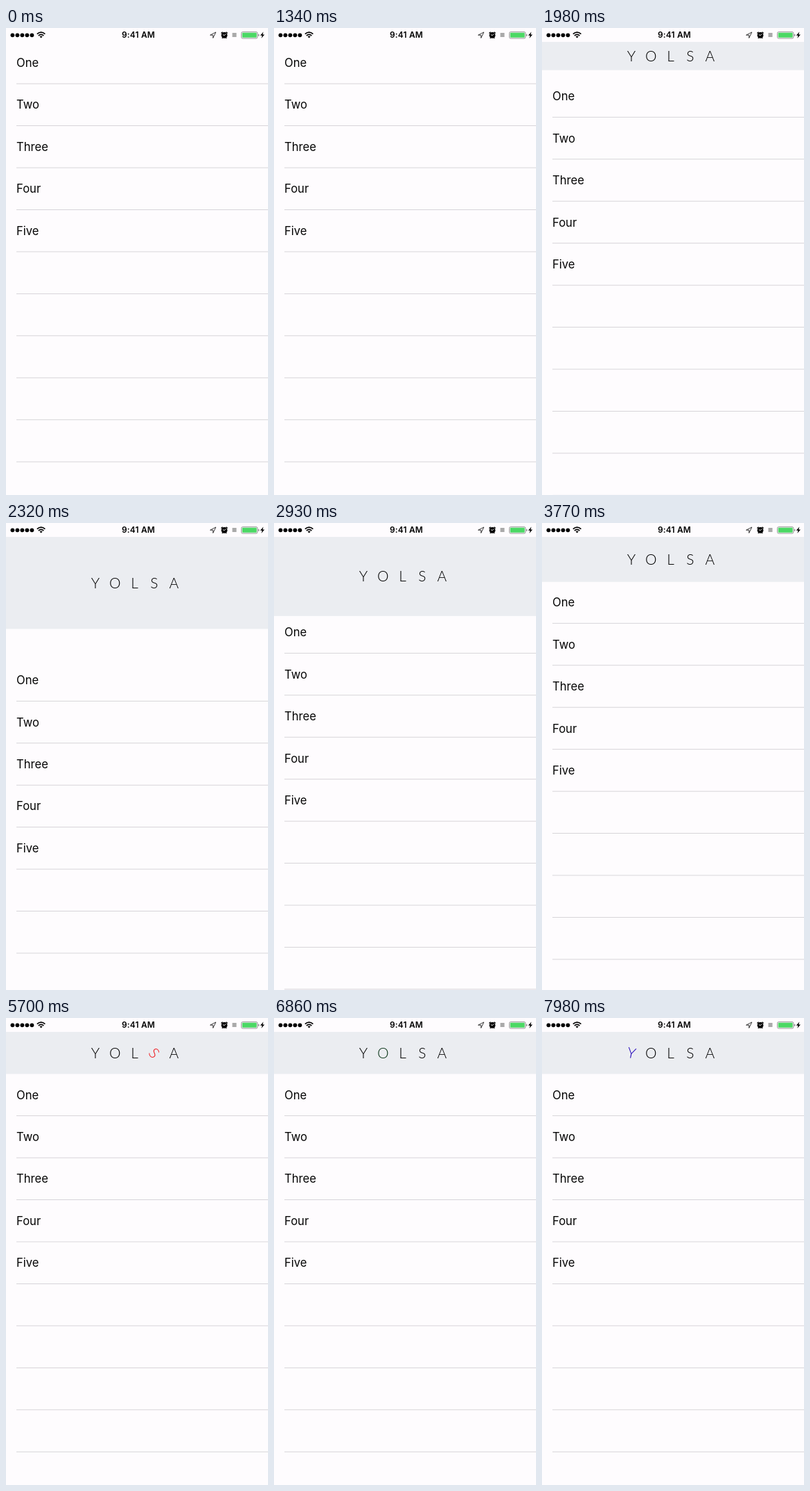
An HTML page for the animation above (8 s loop, 378x672 px).

```html
<!DOCTYPE html>
<html lang="en">
<head>
<meta charset="utf-8">
<title>Pull to refresh</title>
<style>
  html, body { margin: 0; width: 100%; height: 100%; overflow: hidden; background: #fefcfe; }
  svg { display: block; width: 378px; height: 672px; }
  .row { font: 400 16.6px Inter, sans-serif; fill: #050505; }
  .time { font: 600 11.9px Inter, sans-serif; letter-spacing: .2px; text-anchor: middle; }
  .title { font: 300 20.8px Lato, sans-serif; text-anchor: middle; }
</style>
</head>
<body>
<svg viewBox="0 0 378 672">
  <rect width="378" height="672" fill="#fefcfe"/>
  <g id="list"></g>
  <clipPath id="clip"><rect id="clipBox" y="20" width="378" height="0"/></clipPath>
  <rect id="header" y="20" width="378" height="0" fill="#ebedf1"/>
  <g clip-path="url(#clip)"><g id="title" class="title"></g></g>

  <rect width="378" height="20" fill="#fefcfe"/>
  <g id="dots"></g>
  <g fill="none" stroke="#000" stroke-width="1.7">
    <path d="M44.8 8.6Q50.6 3.6 56.4 8.6M46.9 11Q50.6 7.8 54.3 11"/>
    <path d="M48.6 12.2Q50.6 10.8 52.6 12.2L50.6 14.4Z" fill="#000" stroke="none"/>
  </g>
  <text class="time" x="191" y="14.4">9:41 AM</text>
  <path d="M302.8 6L294.6 10.2H298.7V14.4Z" fill="none" stroke="#222" stroke-width=".9" stroke-linejoin="round"/>
  <circle cx="315" cy="10.4" r="4.4"/>
  <path d="M310.4 7.6L312.6 5.7M319.6 7.6L317.4 5.7M311.8 14.8L312.8 13.6M318.2 14.8L317.2 13.6" stroke="#000" stroke-width="1.3"/>
  <path d="M315 10.6L317.3 8.6M315 10.6L312.8 9.6" stroke="#fff" stroke-width=".9"/>
  <rect x="326.5" y="7" width="6" height="6" fill="#aaa"/>
  <rect x="339.6" y="5.6" width="23.2" height="9.4" rx="1.8" fill="#fefcfe" stroke="#8b8b8b" stroke-width=".9"/>
  <rect x="340.8" y="6.8" width="20.8" height="7" rx=".8" fill="#4bd864"/>
  <path d="M363.8 8.5Q365.4 8.8 365.4 10.3T363.8 12.1Z" fill="#8b8b8b"/>
  <path d="M371.4 5.6L366.8 10.8H369.5L368.4 14.8L373 9.5H370.3Z"/>
</svg>
<script>
const LOOP = 8000, ROW = 60.45, LAG = 44;
const REST = 60.5, PERIOD = 845, SPIN = 790, FIRST_SPIN = 4110;
const $ = id => document.getElementById(id);

function add(parent, tag, attrs, text = '') {
  const el = document.createElementNS('http://www.w3.org/2000/svg', tag);
  for (const key in attrs) el.setAttribute(key, attrs[key]);
  el.textContent = text;
  return parent.appendChild(el);
}

for (let i = 0; i < 5; i++) add($('dots'), 'circle', { cx: 9.4 + 7 * i, cy: 10.3, r: 2.9 });
for (let i = 0; i < 10; i++)
  add($('list'), 'rect', { x: 15, y: 79.7 + ROW * i, width: 363, height: .9, fill: '#d3d1d5' });
['One', 'Two', 'Three', 'Four', 'Five'].forEach((word, i) =>
  add($('list'), 'text', { class: 'row', x: 15, y: 56 + ROW * i }, word));

const colors = [[40, 0, 240], [20, 150, 60], [230, 130, 0], [240, 20, 25], [150, 30, 190]];
const letters = [...'YOLSA'].map((char, i) => {
  const slot = add($('title'), 'g', { transform: `translate(${129 + 28.3 * i} 0)` });
  return add(slot, 'text', { y: 7.5 }, char);
});

// time, offset, speed in px per ms
const drag = [
  [1700, 0, .1], [1980, 48, .16], [2320, 175, 1.15], [2430, 218, 0], [2750, settle(2750), -.243]
];

function settle(t) {
  return REST + 46.8 * Math.exp((2930 - t) / 330);
}

function pull(t) {
  if (t <= drag[0][0]) return 0;
  const i = drag.findIndex(point => t < point[0]);
  if (i < 0) return settle(t);
  const [t0, y0, v0] = drag[i - 1], [t1, y1, v1] = drag[i];
  const d = t1 - t0, u = (t - t0) / d, w = 1 - u;
  return y0 * w * w * (1 + 2 * u) + y1 * u * u * (3 - 2 * u) + d * u * w * (v0 * w - v1 * u);
}

function draw(t) {
  const height = pull(t - LAG);
  $('list').setAttribute('transform', `translate(0 ${pull(t)})`);
  $('header').setAttribute('height', height);
  $('clipBox').setAttribute('height', height);
  $('title').setAttribute('transform', `translate(0 ${20 + height / 2})`);

  // letters turn one after another, from right to left
  letters.forEach((el, i) => {
    const p = (t - FIRST_SPIN - PERIOD * (4 - i)) / SPIN;
    const active = p > 0 && p < 1;
    const mix = active ? Math.min(1, p * 1.25) : 0;
    el.setAttribute('transform', `rotate(${active ? 60 * p ** 3.4 : 0})`);
    el.setAttribute('fill', `rgb(${colors[i].map(c => Math.round(c * mix))})`);
  });
}

const start = performance.now();
function tick() {
  draw((performance.now() - start) % LOOP);
  requestAnimationFrame(tick);
}
tick();
</script>
</body>
</html>
```
